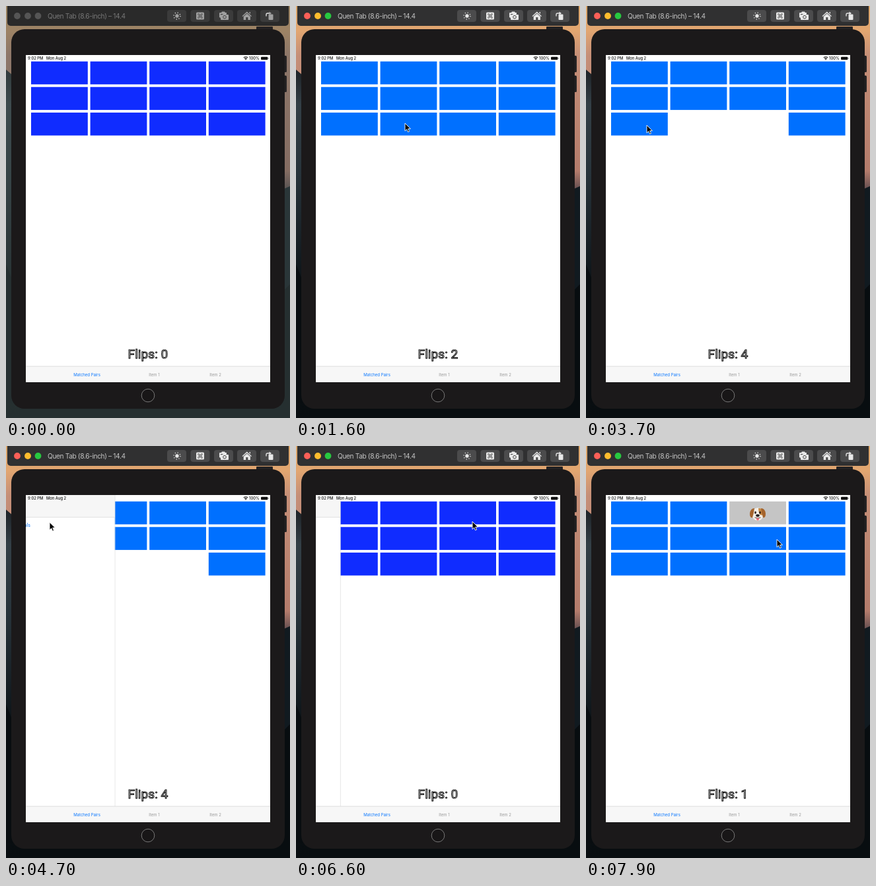
Recreate the animation shown at these times as an HTML page. Size 430x622 px, loop 8 s.

```html
<!DOCTYPE html>
<html lang="en">
<head>
<meta charset="utf-8">
<title>Card matching game</title>
<style>
  html, body { margin: 0; width: 100%; height: 100%; overflow: hidden; background: #0a0f12; }
  svg { display: block; width: 430px; height: 622px; }
  text { font-family: Inter, "Open Sans", sans-serif; }
  .small { font-size: 5.8px; font-weight: 500; fill: #111; }
  .tab { font-size: 6px; text-anchor: middle; fill: #999; }
  #flips { font: 19.2px Roboto, Arial, sans-serif; text-anchor: middle; fill: #fff; stroke: #000; stroke-width: 1; }
</style>
</head>
<body>
<svg viewBox="0 0 430 622" xmlns="http://www.w3.org/2000/svg">
  <defs>
    <linearGradient id="dusk" x1="0" y1="0" x2="0" y2="1">
      <stop offset="0" stop-color="#d9a468"/>
      <stop offset=".06" stop-color="#e2a671"/>
      <stop offset=".12" stop-color="#c58f78"/>
      <stop offset=".4" stop-color="#b57c6c"/>
      <stop offset=".46" stop-color="#4a4048"/>
      <stop offset=".6" stop-color="#141c21"/>
      <stop offset="1" stop-color="#080d10"/>
    </linearGradient>
    <linearGradient id="hill" x1="0" y1="0" x2="0" y2="1">
      <stop offset="0" stop-color="#1d2226"/>
      <stop offset=".1" stop-color="#333f46"/>
      <stop offset=".3" stop-color="#27333a"/>
      <stop offset=".6" stop-color="#0e1519"/>
      <stop offset="1" stop-color="#080d10"/>
    </linearGradient>
    <clipPath id="screen"><rect x="30" y="74" width="370" height="494"/></clipPath>
    <clipPath id="pane"><rect x="30" y="74" width="370" height="470"/></clipPath>
  </defs>

  <rect width="430" height="622" fill="url(#dusk)"/>
  <path d="M0 96L14 108L40 150V622H0Z" fill="url(#hill)"/>
  <path d="M430 272L412 280V622H430Z" fill="#111a20"/>
  <path d="M0 390Q8 410 20 440V622H430V420L410 440V600H0Z" fill="#080d10"/>
  <rect id="dim" width="430" height="622" fill="#4a5a58"/>

  <rect id="bar" x="2" y="-6" width="426" height="36" rx="5"/>
  <g id="lights"></g>
  <text id="title" x="63" y="18.8" font-size="10.2" letter-spacing="-.38">Quen Tab (8.6-inch) – 14.4</text>
  <g id="tools">
    <g id="keys"></g>
    <circle cx="259" cy="15" r="2.7"/>
    <circle cx="259" cy="15" r="5" fill="none" stroke="#e8e8e8" stroke-width="1.3" stroke-dasharray="1.2 2.727"/>
    <rect x="288" y="9.5" width="12" height="11" rx="1.5"/>
    <path d="M292.7 13.7h2.6v2.6h-2.6zM292.7 13.7h-1.1a1.1 1.1 0 1 1 1.1-1.1zM295.3 13.7v-1.1a1.1 1.1 0 1 1 1.1 1.1zM295.3 16.3h1.1a1.1 1.1 0 1 1-1.1 1.1zM292.7 16.3v1.1a1.1 1.1 0 1 1-1.1-1.1z" fill="none" stroke="#444" stroke-width=".8"/>
    <path d="M323 17V11q0-1 1-1h2l1-1.5h4l1 1.500h2V12H325V18Z"/>
    <path d="M326 13h2l1-1.300h4l1 1.300h2q1 0 1 1v6q0 1-1 1h-10q-1 0-1-1v-6q0-1 1-1Z"/>
    <circle cx="331" cy="16.700" r="2.300" fill="none" stroke="#444"/>
    <path d="M357.500 15.200L364.800 8.600L372 15.200L371 16.100L364.800 10.500L358.500 16.100ZM359.700 16L364.800 11.500L369.900 16V21H366.300V17H363.300V21H359.700ZM368.500 9h1.500v3l-1.500-1.400Z"/>
    <rect x="397.500" y="12.500" width="7" height="8.500" rx="1"/>
    <path d="M394 15.500V13q0-2 2-2h3" fill="none" stroke="#e8e8e8" stroke-width="1.300"/>
    <path d="M398.500 8.500L402 11L398.500 13.500Z"/>
  </g>

  <g fill="#242223">
    <rect x="379" y="31" width="25" height="6" rx="1"/>
    <rect x="419" y="75" width="6" height="25" rx="1.500"/>
    <rect x="419" y="105" width="6" height="25" rx="1.500"/>
  </g>
  <rect x="8" y="35" width="414" height="573" rx="20" fill="#1b191a"/>
  <circle cx="215" cy="588" r="9.800" fill="#181617" stroke="#777" stroke-width="1"/>

  <g clip-path="url(#screen)">
    <rect x="30" y="74" width="370" height="494" fill="#fff"/>
    <g id="cards"></g>
    <g id="smile" transform="translate(81 178.500)">
      <circle r="11" fill="#ffcb3d"/>
      <circle cx="-4" cy="-3" r="1.600" fill="#5a3510"/><circle cx="4" cy="-3" r="1.600" fill="#5a3510"/>
      <path d="M-6 3Q0 10 6 3Z" fill="#5a3510"/>
    </g>
    <g id="ball" transform="translate(170.500 178.500)">
      <circle r="11" fill="#ee7a2d"/>
      <path d="M-11 0H11M0-11V11M-7.500-8Q0 0-7.500 8M7.500-8Q0 0 7.500 8" fill="none" stroke="#3a2412"/>
    </g>
    <g id="dog" transform="translate(260 102)">
      <ellipse cy="1" rx="8.700" ry="9.800" fill="#f3efe8"/>
      <path d="M1-8Q8-9 8.500-1Q7 5 3 1Q1-3 1-8Z" fill="#c88a45"/>
      <path d="M-5-8Q-11-8-12 0Q-12 7-8 6Q-6 0-5-8ZM5-8Q11-8 12 0Q12 7 8 6Q6 0 5-8Z" fill="#a5642c"/>
      <ellipse cx="-3.500" cy="-1.500" rx="1.300" ry="1.900" fill="#2a1a12"/>
      <ellipse cx="3.500" cy="-1.500" rx="1.300" ry="1.900" fill="#2a1a12"/>
      <ellipse cy="3" rx="2.800" ry="1.900" fill="#24201f"/>
      <path d="M-4.500 6Q0 8 4.500 6" fill="none" stroke="#4a3530" stroke-width=".9"/>
      <path d="M-2 7H2V9Q0 12-2 9Z" fill="#ee6f7c"/>
    </g>
    <text id="flips" x="215" y="532"></text>
    <g clip-path="url(#pane)">
      <g id="side">
        <rect x="-2" y="74" width="156" height="470" fill="#fff"/>
        <rect x="-2" y="74" width="156" height="34" fill="#f6f6f6"/>
        <path d="M-2 107.500H154" stroke="#d8d8d8" stroke-width=".7"/>
        <path d="M154.300 74V544" stroke="#dedede" stroke-width=".7"/>
        <text id="row" x="0" y="121.500" font-size="7" fill="#0070ff">Animals</text>
      </g>
    </g>
    <rect x="30" y="544" width="370" height="24" fill="#f7f7f7"/>
    <path d="M30 544H400" stroke="#d5d5d5" stroke-width=".8"/>
    <text class="tab" x="122.500" y="559.200" style="fill:#0a78ff">Matched Pairs</text>
    <text class="tab" x="224.500" y="559.200">Item 1</text>
    <text class="tab" x="317" y="559.200">Item 2</text>
    <text class="small" x="33" y="81">9:02 PM</text>
    <text class="small" x="61" y="81">Mon Aug 2</text>
    <text class="small" x="368" y="81">100%</text>
    <path d="M359.800 78Q363 75.400 366.200 78M361.200 79.600Q363 78.200 364.800 79.600" fill="none" stroke="#111" stroke-width="1.100"/>
    <circle cx="363" cy="80.800" r=".8" fill="#111"/>
    <rect x="386" y="76.700" width="10.400" height="4.600" rx="1.300" fill="#111"/>
    <rect x="396.900" y="78.200" width=".8" height="1.600" fill="#777"/>
  </g>

  <path id="cursor" d="M0 0V11.600L2.700 9.100L4.500 13.200L6.500 12.300L4.700 8.300H8.400Z" fill="#000" stroke="#fff" stroke-width=".9" stroke-linejoin="round"/>
</svg>

<script>
const LOOP = 8000, STEP = 100;
const $ = id => document.getElementById(id);
const add = (parent, tag, attrs) => {
  const el = document.createElementNS("http://www.w3.org/2000/svg", tag);
  for (const k in attrs) el.setAttribute(k, attrs[k]);
  return parent.appendChild(el);
};
const fill = (el, c) => el.setAttribute("fill", c);
const show = (el, on) => el.style.display = on ? "" : "none";
const clamp = v => Math.max(0, Math.min(1, v));
const easeOut = v => 1 - (1 - clamp(v)) ** 3;

const cards = Array.from({ length: 12 }, (_, i) => add($("cards"), "rect", {
  x: 38 + (i % 4) * 89.6, y: 83.7 + (i >> 2) * 38.6, width: 85.8, height: 34.6
}));
const lights = [17, 33, 48.5].map(cx => add($("lights"), "circle", { cx, cy: 15, r: 4.9 }));
const keys = [244, 279.5, 315, 350, 385].map(x =>
  add($("keys"), "rect", { x, y: 6, width: 29, height: 18, rx: 4 }));
const colours = ["#fe5f57", "#febc2e", "#28c840"];

// Pointer track: time, x, y
const track = [
  [0, -14, 500], [100, -8, 512], [300, 24, 400], [500, 76, 235], [700, 94, 177],
  [1100, 94, 177], [1400, 165, 177], [2300, 165, 177], [2800, 252, 182],
  [3200, 252, 182], [3700, 92, 180], [4100, 8, 103], [4300, 18, 113],
  [4400, 18, 113], [4800, 82, 116], [5000, 82, 117], [5400, 53, 121],
  [5600, 53, 121], [6200, 266, 115], [6300, 267, 114], [7300, 267, 114],
  [7700, 300, 139], [7900, 289, 141], [8000, 289, 141]
];

// Game states: start, flips, face-up card, theme in use
const states = [
  [0, 0, -1, false], [900, 1, 8, true], [1600, 2, -1, true], [2100, 3, 9, true],
  [3000, 4, -1, true], [5600, 0, -1, false], [7200, 1, 2, true]
];

function pointer(t) {
  const i = track.findIndex(k => k[0] > t);
  const [t0, x0, y0] = track[i - 1], [t1, x1, y1] = track[i];
  const p = (t - t0) / (t1 - t0);
  return [x0 + (x1 - x0) * p, y0 + (y1 - y0) * p];
}

function draw(t) {
  const active = t >= 300;
  $("dim").setAttribute("opacity", .45 * (1 - clamp((t - 100) / 400)));
  fill($("bar"), active ? "#303031" : "#2a2a2a");
  fill($("title"), active ? "#c4c4c4" : "#777");
  lights.forEach((el, i) => fill(el, active ? colours[i] : "#555"));
  keys.forEach(el => fill(el, active ? "#4b4b4c" : "#3b3b3b"));
  fill($("tools"), active ? "#e8e8e8" : "#a0a0a0");

  const [, flips, up, started] = states.filter(s => s[0] <= t).pop();
  const matched = t >= 3000 && t < 5600;
  cards.forEach((el, i) => {
    show(el, !(matched && (i === 9 || i === 10)));
    fill(el, i === up ? "#c5c5c5" : started ? "#0070ff" : "#102cff");
  });
  show($("smile"), up === 8);
  show($("ball"), up === 9);
  show($("dog"), up === 2);
  $("flips").textContent = "Flips: " + flips;

  const open = easeOut((t - 4420) / 560) - easeOut((t - 6430) / 450);
  show($("side"), open > .003);
  $("side").setAttribute("transform", `translate(${30 - 154 * (1 - open)} 0)`);
  $("row").setAttribute("opacity", t >= 5400 && t < 5600 ? .25 : 1);
  $("cursor").setAttribute("transform", `translate(${pointer(t)})`);
}

function tick() {
  const t = performance.now() % LOOP;
  draw(Math.floor(t / STEP) * STEP);
  requestAnimationFrame(tick);
}
tick();
</script>
</body>
</html>
```
